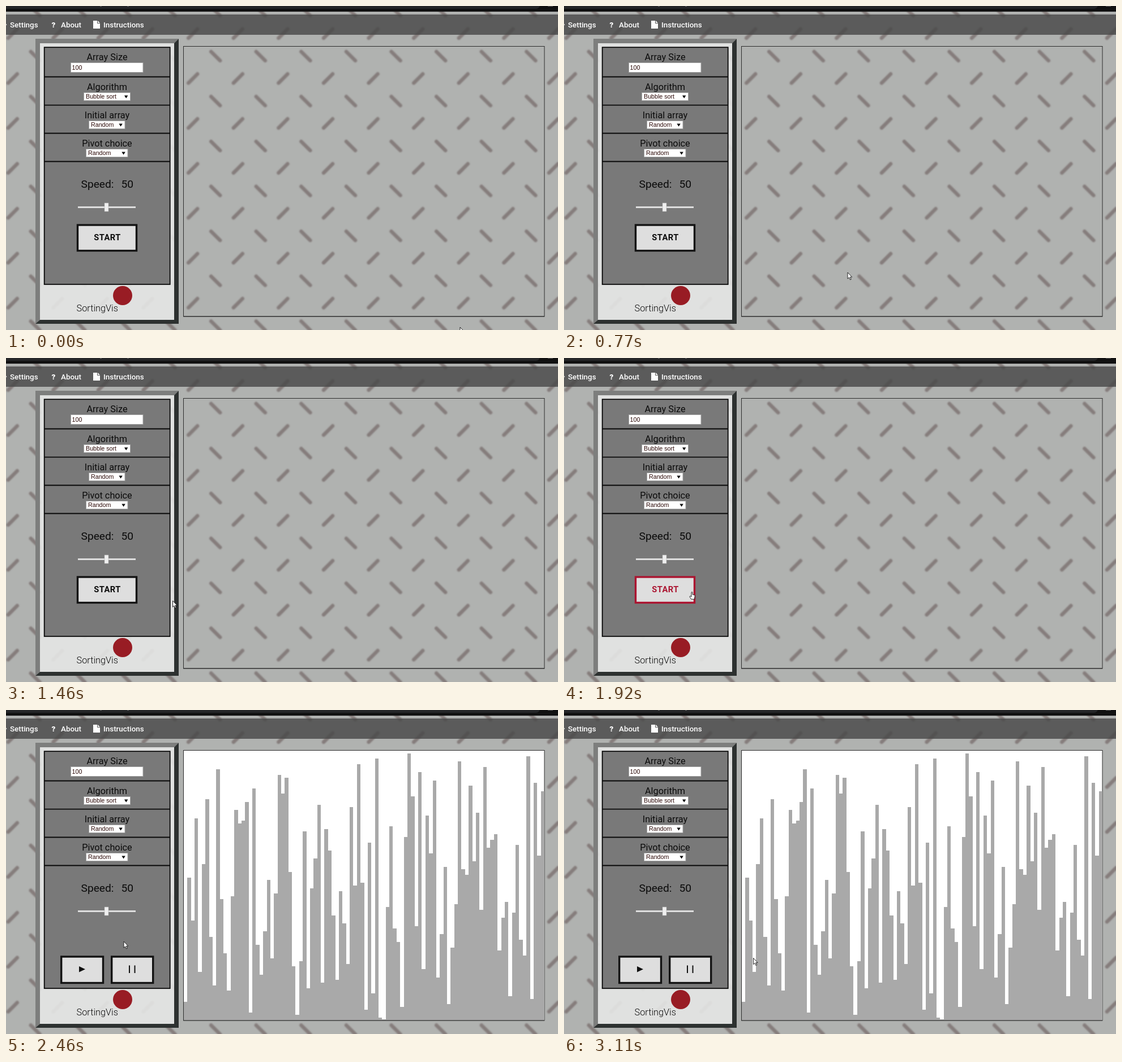
Write an HTML page that moves like this. It is 975x574 px and loops after 3.16 s.

```html
<!DOCTYPE html>
<html lang="en">
<head>
<meta charset="utf-8">
<title>Sorting visualiser</title>
<style>
  html, body { margin: 0; width: 100%; height: 100%; overflow: hidden; background: #b0b2b0; }
  svg { display: block; width: 975px; height: 574px; }
  text { font: 16.3px Roboto, sans-serif; fill: #0b0b0b; white-space: pre; }
  .mid { text-anchor: middle; }
  .nav text { font-size: 13.4px; font-weight: 500; fill: #fff; }
  .form text { font: 10.7px "Liberation Sans", Arial, sans-serif; fill: #2c0a08; }
  .form rect { fill: #fff; stroke: #a2a2a2; }
  .button rect { fill: #dedede; stroke: #131313; stroke-width: 3.4; }
  #start text { font-size: 14.6px; font-weight: 600; letter-spacing: .5px; }
  #start.hover rect { stroke: #ab1430; }
  #start.hover text { fill: #ab1430; }
  #start .focus { fill: none; stroke: #55101c; stroke-width: 1; stroke-dasharray: 1 1; }
  .pointer { fill: #fff; stroke: #111; stroke-width: .9; stroke-linejoin: round; }
</style>
</head>
<body>
<svg viewBox="0 0 975 574">
  <defs>
    <pattern id="plate" x="330.2" y="88.8" width="79.6" height="79.6" patternUnits="userSpaceOnUse">
      <path d="M32 -8L48 8M32 71.6L48 87.6M-8 47.6L8 31.6M71.6 47.6L87.6 31.6"
            stroke="#857d7c" stroke-width="6.5" stroke-linecap="round"/>
    </pattern>
    <filter id="soft"><feGaussianBlur stdDeviation="1.3"/></filter>
  </defs>

  <rect width="975" height="574" fill="#b0b2b0"/>
  <rect x="-20" y="-20" width="1015" height="614" fill="url(#plate)" filter="url(#soft)"/>

  <rect width="975" height="10" fill="#111"/>
  <rect x="-10" y="-10" width="953" height="15" rx="7" fill="#252628"/>
  <path d="M166 0h3M214 0h3M957 0h9" stroke="#aaa"/>

  <g class="nav">
    <rect y="15" width="975" height="36" fill="#484848" fill-opacity=".82"/>
    <circle cy="33" r="1.3" fill="#ddd"/>
    <text x="7" y="38">Settings</text>
    <text x="80.5" y="38" style="font-weight:900">?</text>
    <text x="97" y="38">About</text>
    <path d="M154 26h7v5h5v9h-12zM162 26l4 4h-4z" fill="#fff"/>
    <text x="172" y="38">Instructions</text>
  </g>

  <rect x="60" y="66" width="237" height="490" fill="#e6e7e6" fill-opacity=".9"/>
  <path d="M52 58H305L297 66H60V556L52 563Z" fill="#7d7e7d"/>
  <path d="M305 58V563H52L60 556H297V66Z" fill="#2d3130"/>
  <rect x="67.7" y="73.2" width="222" height="420" fill="#6c6c6c" fill-opacity=".88" stroke="#080808" stroke-width="1.8"/>
  <path d="M68 125.5H290M68 175.7H290M68 225.5H290M68 275.5H290" stroke="#080808" stroke-width="1.8"/>

  <g class="mid">
    <text x="178.5" y="95.5">Array Size</text>
    <text x="178.5" y="148.5">Algorithm</text>
    <text x="178.5" y="198.5">Initial array</text>
    <text x="178.5" y="248.5">Pivot choice</text>
  </g>
  <g class="form">
    <rect x="114.5" y="100.5" width="127.5" height="17"/><text x="116.5" y="113">100</text>
    <rect x="137.5" y="153.5" width="82" height="14"/><text x="141" y="164">Bubble sort</text>
    <rect x="146.5" y="203.5" width="63.5" height="14"/><text x="150" y="214">Random</text>
    <rect x="141.5" y="253.5" width="73.5" height="14"/><text x="145" y="264">Random</text>
    <path d="M209 158.5h6.4l-3.2 5zM199.4 208.5h6.4l-3.2 5zM204.4 258.5h6.4l-3.2 5z"/>
  </g>

  <text x="132.5" y="321.5" style="font-size:19.2px">Speed:</text>
  <text x="203.5" y="321.5" style="font-size:19.2px">50</text>
  <rect x="127" y="355" width="102" height="3" fill="#dedede"/>
  <rect x="174" y="349" width="7" height="15" fill="#efefef" stroke="#aaa" stroke-width=".6"/>

  <circle cx="206" cy="513" r="17" fill="#981c24"/>
  <text x="124.5" y="540.5" style="font-weight:300">SortingVis</text>

  <rect id="chart" x="313.5" y="71.5" width="637.5" height="478.5" fill="none" stroke="#2c2c2c"/>
  <path id="bars" fill="#a9a9a9" shape-rendering="crispEdges"/>
  <path d="M313.5 550H951" stroke="#2c2c2c"/>

  <g id="start" class="button">
    <rect x="126.5" y="388" width="104" height="45.5"/>
    <text class="mid" x="179" y="415.3">START</text>
    <path id="focus" class="focus" d="M124.5 386.5H232.5V435.5H124.5Z"/>
  </g>
  <g id="controls" class="button">
    <rect x="97.7" y="437" width="73.8" height="46.5"/>
    <rect x="186.7" y="437" width="73" height="46.5"/>
    <path d="M129 454L140 459.3L129 464.6ZM217 452.5h2v13.5h-2zM226.5 452.5h2v13.5h-2z" fill="#111"/>
  </g>

  <circle id="click" cx="208" cy="411" r="10" fill="#f0e428" fill-opacity=".82"/>
  <path id="arrow" class="pointer" d="M0 0V11.2L2.6 8.9L4.4 13L6.2 12.2L4.4 8.2H7.7Z"/>
  <path id="hand" class="pointer" d="M-1 7V1.2Q0 -.6 1 1.2V5L4.5 6Q5.3 6.2 5.2 8L4.4 13.3H-1.2L-3.8 9.5Q-4.4 7.4 -2.6 7.8L-1 9Z"/>
</svg>
<script>
const LOOP = 3160, TICK = 77;
const HOVER = 24, PRESS = 29, SORT = 32;
const $ = id => document.getElementById(id);

const values = [
  7, 53, 37, 75, 18, 58, 82, 31, 13, 93, 45, 25, 11, 46, 78, 73, 74, 81, 3, 86,
  28, 17, 33, 52, 23, 47, 91, 84, 90, 55, 20, 2, 22, 70, 12, 49, 60, 80, 14, 71,
  63, 39, 15, 48, 36, 21, 79, 50, 95, 51, 4, 66, 10, 97, 1, 0, 42, 72, 34, 29,
  5, 68, 99, 83, 35, 92, 19, 76, 62, 89, 16, 32, 57, 6, 27, 43, 96, 56, 54, 87,
  59, 77, 41, 94, 64, 67, 69, 26, 38, 44, 9, 40, 65, 30, 24, 98, 8, 88, 61, 85];

// [tick, x, y]
const pointerPath = [
  [0, 802, 569], [7, 573, 492], [10, 501, 472], [14, 392, 450], [19, 294.5, 430], [21, 265, 423],
  [24, 231, 415], [28, 211, 411], [30, 208, 410], [37, 208, 410], [38, 212, 411], [39, 250, 420], [40, 334.5, 439.5]];
// [tick, finished comparisons]
const sortPace = [[SORT, 3], [36, 11], [40, 17]];

function track(keys, tick) {
  const i = Math.max(1, keys.findIndex(key => key[0] >= tick));
  const [t0, ...a] = keys[i - 1], [t1, ...b] = keys[i];
  const u = (tick - t0) / (t1 - t0);
  return a.map((v, j) => v + (b[j] - v) * u);
}

function bubble(steps) {
  const list = [...values];
  for (let j = 2; j < steps; j++)
    if (list[j] > list[j + 1]) [list[j], list[j + 1]] = [list[j + 1], list[j]];
  return list;
}

function barPath(list) {
  const edge = i => Math.round(314 + i * 6.37);
  return list.map((v, i) =>
    `M${edge(i)} 550V${Math.round(550 - Math.max(2, v * 4.78))}H${edge(i + 1)}V550Z`).join('');
}

function show(id, on) { $(id).style.display = on ? '' : 'none'; }

function draw() {
  const tick = Math.min(40, Math.floor((performance.now() % LOOP + 8) / TICK));
  const sorting = tick >= SORT, hover = tick >= HOVER && !sorting, pressed = tick >= PRESS && !sorting;
  const [x, y] = track(pointerPath, tick);

  show('start', !sorting);
  show('controls', sorting);
  show('focus', pressed);
  show('click', pressed);
  show('hand', hover);
  show('arrow', !hover);
  $('start').classList.toggle('hover', hover);
  $(hover ? 'hand' : 'arrow').setAttribute('transform', `translate(${x} ${y})`);

  $('chart').setAttribute('fill', sorting ? '#fff' : 'none');
  $('bars').setAttribute('d', sorting ? barPath(bubble(Math.floor(track(sortPace, tick)[0]))) : '');
  requestAnimationFrame(draw);
}
draw();
</script>
</body>
</html>
```
